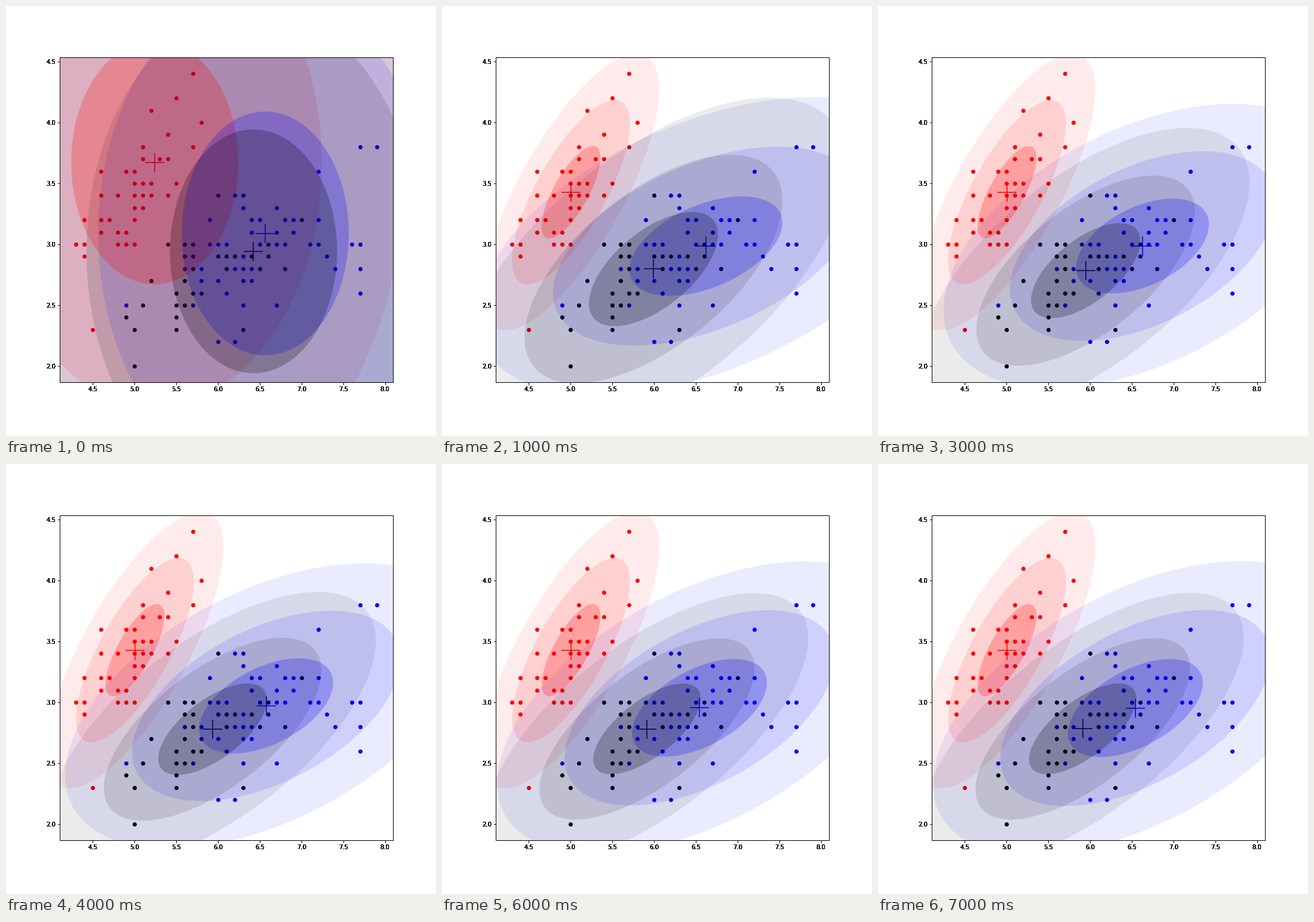
A matplotlib script that plays this animation: 720 px wide and 720 px high, repeating every 8 s.

```python
import numpy as np
import matplotlib.pyplot as plt
from matplotlib.animation import FuncAnimation
from matplotlib.patches import Polygon

RECT = [0.125, 0.125, 0.775, 0.755]
COLORS = ["red", "blue", "black"]
ALPHA = 0.23

# Points in tenths: row y -> x values
RED_DOTS = {
    44: [57], 42: [55], 41: [52], 40: [58], 39: [54], 38: [51, 57],
    37: [51, 53, 54], 36: [46, 49, 50], 35: [50, 51, 52, 55],
    34: [46, 48, 50, 51, 52, 54], 33: [50, 51], 32: [44, 46, 47, 50],
    31: [46, 48, 49], 30: [43, 44, 48, 49, 50], 29: [44], 23: [45],
}
BLUE_DOTS = {
    38: [77, 79], 36: [72], 34: [62, 63], 33: [63, 67],
    32: [59, 64, 65, 68, 69, 72], 31: [64, 67, 69],
    30: [59, 60, 61, 65, 67, 68, 71, 72, 76, 77], 29: [63, 73],
    28: [56, 58, 62, 63, 64, 74, 77], 27: [58, 60, 63, 64],
    26: [61, 77], 25: [49, 57, 63, 67], 22: [60, 62],
}
BLACK_DOTS = {
    34: [60], 32: [70], 30: [54, 56, 57, 66],
    29: [56, 57, 60, 61, 62, 64, 66], 28: [57, 61, 65, 68],
    27: [52, 56], 26: [55, 57, 58], 25: [51, 55, 56], 24: [49, 55],
    23: [50, 55, 63], 20: [50],
}

# Gaussian states: mean x, mean y, sigma x, sigma y, correlation
RED_FIT = [5.006, 3.428, 0.352, 0.378, 0.7425]
RED = np.array([[5.242, 3.672, 1, 1, 0]] + [RED_FIT] * 5)
BLUE = np.array([
    [6.565, 3.089, 1, 1, 0],
    [6.622, 2.985, 0.915, 0.408, 0.47],
    [6.681, 2.996, 0.789, 0.398, 0.44],
    [6.629, 2.986, 0.794, 0.389, 0.455],
    [6.554, 2.964, 0.806, 0.391, 0.50],
    [6.543, 2.953, 0.808, 0.402, 0.515],
])
BLACK = np.array([
    [6.425, 2.942, 1, 1, 0],
    [5.993, 2.797, 0.772, 0.4685, 0.60],
    [5.964, 2.791, 0.694, 0.433, 0.59],
    [5.948, 2.784, 0.654, 0.390, 0.62],
    [5.930, 2.777, 0.650, 0.369, 0.655],
    [5.913, 2.782, 0.642, 0.372, 0.67],
])
# Position of each iteration along the states above
PHASE = [0, 1, 2, 3, 3.7, 4, 4.85, 5]

ANGLE = np.linspace(0, 2 * np.pi, 240, endpoint=False)


def state(track, step):
    keys = np.arange(len(track))
    return [np.interp(PHASE[step], keys, column) for column in track.T]


def outline(mx, my, sx, sy, rho, nsig):
    c, s = np.cos(ANGLE), np.sin(ANGLE)
    x = mx + nsig * sx * c
    y = my + nsig * sy * (rho * c + np.sqrt(1 - rho**2) * s)
    return np.column_stack([x, y])


def add_axes():
    ax = fig.add_axes(RECT, facecolor="none")
    ax.set_xlim(4.105, 8.095)
    ax.set_ylim(1.868, 4.532)
    ax.set_xticks(np.arange(4.5, 8.1, 0.5))
    ax.set_yticks(np.arange(2.0, 4.6, 0.5))
    ax.xaxis.set_major_formatter("{x:.1f}")
    ax.yaxis.set_major_formatter("{x:.1f}")
    return ax


fig = plt.figure(figsize=(10, 10), dpi=72, facecolor="white")
ax = add_axes()
# Stacked frames give the heavy labels and border
for _ in range(5):
    add_axes()

for rows, color in [(RED_DOTS, "red"), (BLACK_DOTS, "black"), (BLUE_DOTS, "blue")]:
    points = np.array([(x, y) for y, xs in rows.items() for x in xs]) / 10
    ax.scatter(*points.T, c=color, zorder=1)

crosses = [ax.scatter([0], [0], s=1000, c=color, marker="+", zorder=1.5)
           for color in COLORS]

ellipses = []
for nsig in (3, 2, 1):
    for k, color in enumerate(COLORS):
        patch = Polygon([[0, 0], [1, 0], [0, 1]], facecolor=color,
                        edgecolor="none", linewidth=0, alpha=ALPHA / nsig, zorder=2)
        ax.add_patch(patch)
        ellipses.append((patch, k, nsig))


def update(step):
    states = [state(track, step) for track in (RED, BLUE, BLACK)]
    for cross, fit in zip(crosses, states):
        cross.set_offsets([fit[:2]])
    for patch, k, nsig in ellipses:
        patch.set_xy(outline(*states[k], nsig))
    return crosses + [patch for patch, _, _ in ellipses]


anim = FuncAnimation(fig, update, frames=len(PHASE), interval=1000,
                     repeat=True, repeat_delay=0, blit=False)
plt.show()
```
